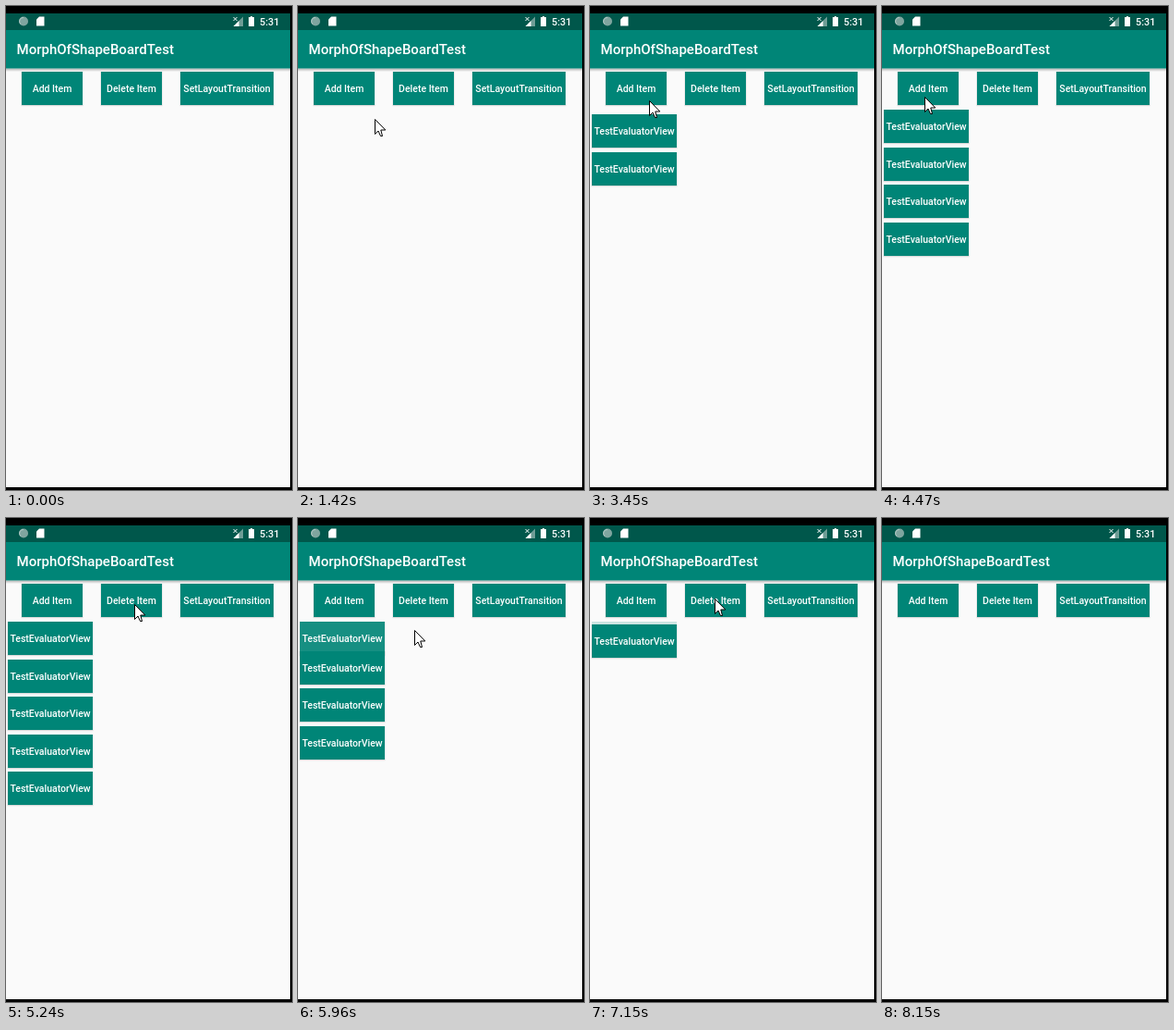
These frames come from a looping animation (310 by 523 pixels, 9.02 s). An HTML page:

```html
<!DOCTYPE html>
<html lang="en">
<head>
<meta charset="utf-8">
<title>List layout transition</title>
<style>
  html, body { margin: 0; width: 100%; height: 100%; overflow: hidden; background: #000; }
  svg { display: block; width: 310px; height: 523px; }
  text { font: 500 10.5px Roboto, sans-serif; fill: #fff; }
  .title { font-size: 15px; }
  .mid { text-anchor: middle; }
  .btn rect { fill: #008577; }
  .btn .shade { fill: #000; opacity: .13; }
</style>
</head>
<body>
<svg viewBox="0 0 310 523">
  <defs>
    <linearGradient id="drop" x2="0" y2="1">
      <stop stop-opacity=".28"/>
      <stop offset="1" stop-opacity="0"/>
    </linearGradient>
  </defs>
  <rect y="8" width="308" height="512" fill="#fafafa"/>
  <rect y="67.5" width="308" height="3.5" fill="url(#drop)"/>
  <rect y="26" width="308" height="41.5" fill="#008577"/>
  <rect y="8" width="308" height="18" fill="#00574b"/>

  <circle cx="19" cy="16.5" r="5" fill="#7fa59f"/>
  <path d="M16 19.500A4 4 0 0 1 19 12.500" fill="none" stroke="#b4cbc7"/>
  <path d="M36 11.500H41.500V21.500H33V14.500Z" fill="#fff"/>
  <path d="M257 11.500V22H246.500Z" fill="#6f9d96"/>
  <path d="M252.500 16V22H246.500Z" fill="#fff"/>
  <path d="M246.500 12l4 4m0-4l-4 4" stroke="#fff"/>
  <path d="M263 12h2V11h2v1h2V22H263Z" fill="#fff"/>
  <text x="275" y="20.700" style="font-size: 10.800px">5:31</text>
  <text class="title" x="11.500" y="52">MorphOfShapeBoardTest</text>

  <g id="items"></g>
  <g id="bar"></g>
  <path id="cursor" d="M.5 .5V16.500L4 13L6.500 18.500H8.500L6.800 12H11.800Z"
        fill="#fff" stroke="#000" stroke-linejoin="round"/>
</svg>
<script>
const LOOP = 9020, SPAN = 300, TOP = 112.2, PITCH = 40.5;
const adds = [1830, 2610, 3382, 4090, 4766];
const removals = adds.map((_, i) => 7415 - 516 * i);

// Turning points of the pointer: time, x, y
const route = [
  [560, 268, 410], [1240, 83, 122], [1420, 83, 122], [1540, 55, 89],
  [2620, 65, 91], [3450, 64, 102], [4470, 46, 98], [4750, 54, 88],
  [5000, 140, 95], [5700, 137, 88], [5960, 126, 121], [6280, 136, 88],
  [7450, 135, 86], [8150, 306, 520]
];

const NS = 'http://www.w3.org/2000/svg';
function make(parent, tag, attrs, text = '') {
  const el = document.createElementNS(NS, tag);
  for (const key in attrs) el.setAttribute(key, attrs[key]);
  el.textContent = text;
  return parent.appendChild(el);
}

function button(parent, x, y, width, label) {
  const g = make(parent, 'g', { class: 'btn' });
  make(g, 'rect', { class: 'shade', x: x - .5, y, width: width + 1, height: 37.2 });
  make(g, 'rect', { x, y, width, height: 36 });
  make(g, 'text', { class: 'mid', x: x + width / 2, y: y + 22 }, label);
  return g;
}

const bar = document.getElementById('bar');
button(bar, 17, 71, 66, 'Add Item');
button(bar, 103, 71, 66, 'Delete Item');
button(bar, 189, 71, 101, 'SetLayoutTransition');

// Newer rows lie beneath older ones
const list = document.getElementById('items');
const rows = adds.map(() => button(list, 2, 0, 92, 'TestEvaluatorView'));
rows.forEach(row => list.prepend(row));
const cursor = document.getElementById('cursor');

function ease(t, start, span = SPAN) {
  const p = Math.min(1, Math.max(0, (t - start) / span));
  return (1 - Math.cos(Math.PI * p)) / 2;
}

function movePointer(t) {
  const i = route.findIndex(p => p[0] > t);
  cursor.style.display = i > 0 ? '' : 'none';
  if (i < 1) return;
  const [t0, x0, y0] = route[i - 1], [t1, x1, y1] = route[i];
  const p = (t - t0) / (t1 - t0);
  const x = Math.round(x0 + (x1 - x0) * p), y = Math.round(y0 + (y1 - y0) * p);
  cursor.setAttribute('transform', `translate(${x} ${y})`);
}

// Each newer row pushes a row one slot down until it is removed
function moveRow(row, i, t) {
  let slot = 0;
  for (let j = i + 1; j < adds.length; j++) slot += ease(t, adds[j]) - ease(t, removals[j]);
  const shown = ease(t, adds[i] + 220, 150) * (1 - ease(t, removals[i] + 36));
  row.setAttribute('transform', `translate(0 ${Math.round(TOP + slot * PITCH)})`);
  row.setAttribute('opacity', shown);
}

const begin = performance.now();
function tick() {
  const t = (performance.now() - begin) % LOOP;
  rows.forEach((row, i) => moveRow(row, i, t));
  movePointer(t);
  requestAnimationFrame(tick);
}
tick();
</script>
</body>
</html>
```
